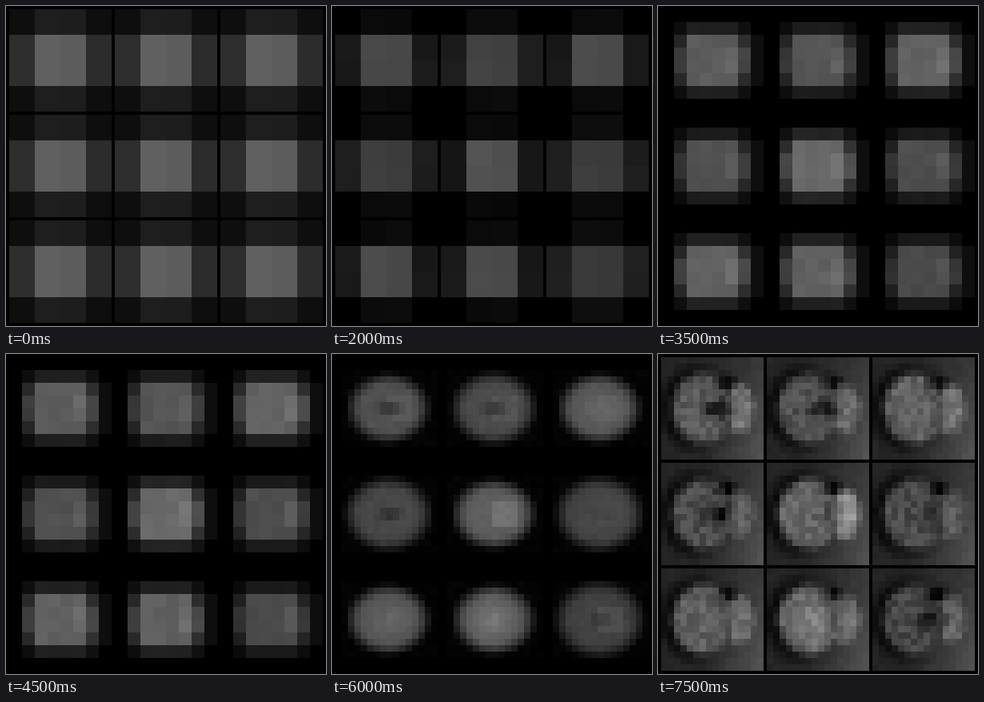
An HTML page with a canvas for the animation above (8000 ms loop, 400 by 400 pixels).

```html
<!DOCTYPE html>
<html>
<head>
<meta charset="utf-8">
<style>
html, body { margin: 0; width: 100%; height: 100%; overflow: hidden; background: #000; }
canvas { display: block; width: 100vmin; height: 100vmin; }
</style>
</head>
<body>
<canvas id="stage" width="400" height="400"></canvas>
<script>
const ctx = document.getElementById('stage').getContext('2d');
const STEP = 500, LOOP = 8000;

// Character of each tile: brightness, dark (-) or light (+) middle, light right side
const tone = [80, 74, 85, 70, 92, 68, 84, 84, 64];
const core = [-1, -.8, .1, -.8, -.1, -.3, .1, .5, -.5];
const lobe = [.7, .7, .4, .2, 1.3, .1, .2, .3, .8];

const clamp = (v, lo = 0, hi = 1) => Math.min(hi, Math.max(lo, v));
const lerp = (a, b, k) => a + (b - a) * k;
const distance = (x, y, cx, cy, rx, ry) => Math.hypot((x + .5 - cx) / rx, (y + .5 - cy) / ry);
const bump = (...ellipse) => Math.exp(-(distance(...ellipse) ** 2));

// Repeatable noise in -1..1
function noise(seed, tile, x, y) {
  let h = Math.imul(seed + 11, 374761393) ^ Math.imul(tile + 3, 668265263)
        ^ Math.imul(x + 7, 2246822519) ^ Math.imul(y + 5, 3266489917);
  h = Math.imul(h ^ (h >>> 15), 2246822519);
  h = Math.imul(h ^ (h >>> 13), 3266489917);
  return ((h ^ (h >>> 16)) >>> 0) / 2147483648 - 1;
}

// 4 x 4 cells
const isMid = v => v === 1 || v === 2;
const start = (tile, x, y) =>
  (96 - (x > 1 ? 4 : 0)) * (isMid(x) ? 1 : .48) * (isMid(y) ? 1 : .31);

function dim(tile, x, y) {
  const level = tone[tile] * .9, n = 2 * noise(1, tile, x, y);
  if (isMid(x) && isMid(y)) return level + 3 - 3 * x + n;
  if (isMid(y)) return 50 - level * .33 + n;
  return isMid(x) ? 20 - level * .13 + n : 0;
}

// 8 x 8 cells
const coarse = (stripe, seed) => (tile, x, y) => {
  const dx = Math.abs(x - 3.55), dy = Math.abs(y - 3.5);
  const cover = clamp(3.2 - dx) * clamp(2.84 - dy) * (dx > 2 && dy > 1 ? .65 : 1);
  const wave = 1 + stripe * Math.cos((x - 2) * 1.96);
  const light = x === 5 && dy < 1 ? 12 : 0;
  const rim = x === 7 && dy < 2 ? 14 * (1 - stripe * 10) : 0;
  return cover * (tone[tile] * 1.14 * wave * (1 + .05 * noise(seed, tile, x, y)) + light) + rim;
};
const stripes = coarse(.09, 2), soft = coarse(0, 3);
const cornered = (tile, x, y) => x % 7 || y % 7 ? stripes(tile, x, y) : 31;

// 16 x 16 cells
const middle = (tile, x, y, depth) => core[tile] < 0
  ? core[tile] * depth * bump(x, y, 8.6, 8, 1.9, 1.2)
  : core[tile] * depth * bump(x, y, 7.5, 8, 3, 4);

const blob = (depth, softness, rough, seed) => (tile, x, y) => {
  const n = noise(seed, tile, x, y);
  const rx = 6.3 + Math.max(0, 80 - tone[tile]) * .035;
  const cover = clamp((1.1 - distance(x, y, 8.3, 8, rx, rx - 1)) / softness);
  const light = 14 * bump(x, y, 8.5, 8, 4, 3)
    + (x > 7 && x < 12 && y > 5 && y < 10 ? 14 * lobe[tile] : 0);
  const halo = x > 0 && y > 1 && y < 14 ? 3 + 3 * n : 0;
  return Math.max(halo, cover * (tone[tile] * .94 + light + middle(tile, x, y, depth) + n * rough));
};
const slots = blob(42, .4, 4, 5), holes = blob(56, .3, 6, 6);

function textured(tile, x, y) {
  const n = noise(7, tile, x, y);
  const d = distance(x, y, 6.7, 8, 5, 5.4);
  const head = clamp((1.1 - d) / .25);
  const side = clamp((1.1 - distance(x, y, 12.2, 8, 2.5, 4.2)) / .4);
  const shade = Math.exp(-(((d - 1.15) / .25) ** 2)) * clamp(1.1 - x / 10);
  const back = 37 + 46 * (x / 15) ** 2 * (.4 + .6 * y / 15) - 26 * shade + n * 3;
  const skin = tone[tile] * 1.1 + n * 17;
  let v = lerp(back, skin + 12 + 25 * lobe[tile], side);
  v = lerp(v, skin + middle(tile, x, y, 75), head);
  return v - 55 * bump(x, y, 10.2, 4.2, 1.7, 1.1) - 22 * bump(x, y, 10, 8, 1, 3);
}

const mix = (a, b, k) => (...cell) => lerp(a(...cell), b(...cell), k);
const finer = look => (tile, x, y) => look(tile, x >> 1, y >> 1);

// [cells per side, look] for each step
const scenes = [
  [4, start], [4, start], [4, dim], [4, dim], [4, dim],
  [8, cornered], [8, mix(stripes, soft, .6)], [8, soft], [8, coarse(0, 4)], [8, coarse(0, 4)],
  [16, mix(finer(soft), slots, .55)], [16, slots],
  [16, mix(slots, holes, .33)], [16, mix(slots, holes, .67)], [16, holes],
  [16, textured]
];

function draw([n, look]) {
  const size = 128 / n;
  ctx.fillStyle = '#000';
  ctx.fillRect(0, 0, 400, 400);
  for (let tile = 0; tile < 9; tile++) {
    const left = 4 + tile % 3 * 132, top = 4 + Math.floor(tile / 3) * 132;
    for (let y = 0; y < n; y++)
      for (let x = 0; x < n; x++) {
        const v = Math.round(clamp(look(tile, x, y), 0, 255));
        ctx.fillStyle = `rgb(${v},${v},${v})`;
        ctx.fillRect(left + x * size, top + y * size, size, size);
      }
  }
}

const begin = performance.now();
let shown = -1;
function tick() {
  const step = Math.floor((performance.now() - begin) % LOOP / STEP);
  if (step !== shown) draw(scenes[shown = step]);
  requestAnimationFrame(tick);
}
tick();
</script>
</body>
</html>
```
